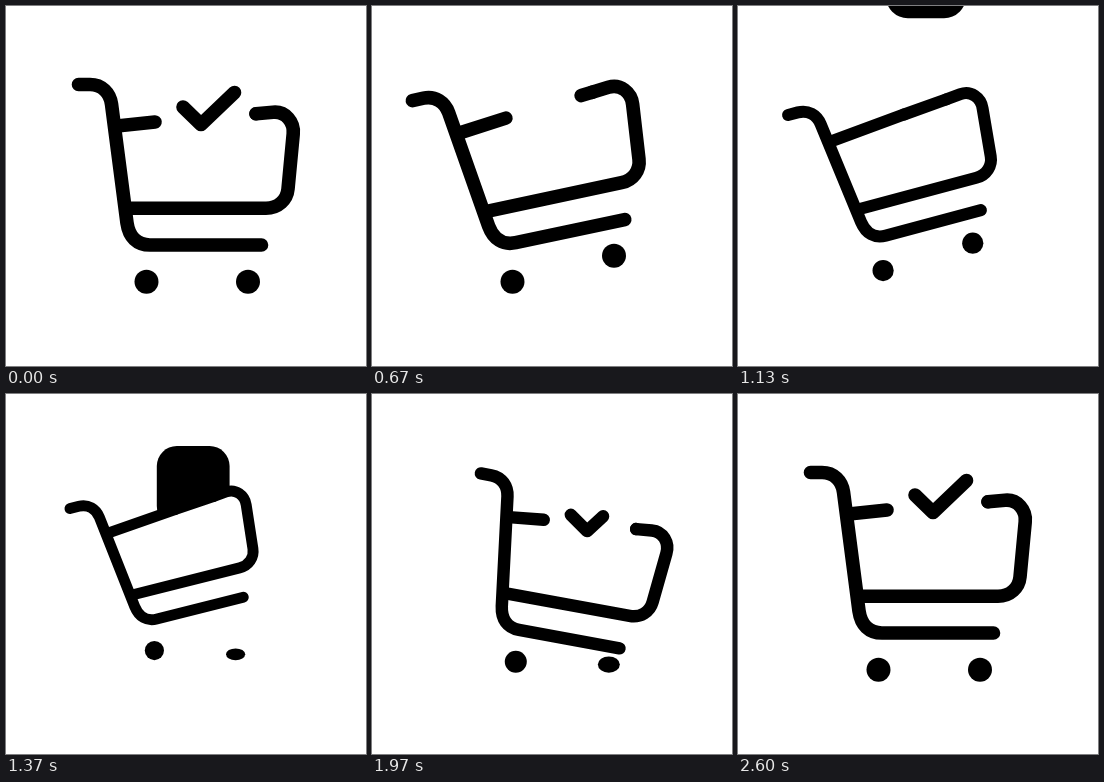
An HTML page for the animation above (2.63 s loop, 360x360 px).

```html
<!DOCTYPE html>
<html lang="en">
<head>
<meta charset="utf-8">
<title>Cart</title>
<style>
  html, body { margin: 0; width: 100%; height: 100%; overflow: hidden; background: #fff; }
  svg { display: block; width: 100%; height: 100%; }
  .line { fill: none; stroke: #000; stroke-width: 13.6; stroke-linecap: round; stroke-linejoin: round; }
</style>
</head>
<body>
<svg viewBox="0 0 360 360">
  <defs>
    <clipPath id="above"><path id="rim" d="M-400 168 L700 64.5 V-500 H-400Z"/></clipPath>
  </defs>
  <g id="all">
    <g clip-path="url(#above)"><rect id="box" x="143.500" width="91" height="100" rx="25"/></g>
    <g id="cart" class="line">
      <path d="M72.500 78.500H84C96 78.500 104 87 105.500 98L121 217C123 231 131 239 144 239H255.500"/>
      <path d="M120 202.300H260C272 202.300 281 194 282 183L287.200 128C288.500 116 279.500 105 267 106.200L250 107.800"/>
      <path id="leftBar"/>
      <path id="rightBar"/>
      <path id="check" d="M177 101L195 118.500L228.500 86.500" pathLength="1"/>
    </g>
    <circle cx="140.500" cy="275.700" r="12"/>
    <ellipse id="wheel" cx="242" rx="12"/>
  </g>
</svg>
<script>
const LOOP = 2630;
const PIVOT = '133 239.5';
const $ = id => document.getElementById(id);
const set = (id, attrs) => {
  for (const k in attrs) $(id).setAttribute(k, attrs[k]);
};
const clamp = p => Math.max(0, Math.min(1, p));
const span = (t, a, b) => clamp((t - a) / (b - a));
const ease = (t, a, b) => {
  const p = span(t, a, b);
  return p < 0.5 ? 4 * p ** 3 : 1 - 4 * (1 - p) ** 3;
};

function draw(t) {
  const tilt = -15 * ease(t, 364, 850) + 25.6 * ease(t, 1280, 1731) - 10.6 * ease(t, 1922, 2202);
  const scale = 1 - 0.2 * ease(t, 960, 1283) + 0.1 * ease(t, 1370, 1734) + 0.1 * ease(t, 1897, 2110);
  const turn = `rotate(${tilt} ${PIVOT})`;
  set('all', { transform: `translate(180 180) scale(${scale}) translate(-180 -180)` });
  set('cart', { transform: turn });
  set('rim', { transform: turn });

  // The two halves of the rim meet in the middle
  const shut = ease(t, 560, 850) - ease(t, 1640, 1900);
  const reach = 50.5 * shut;
  set('leftBar', { d: `M111 120L${149 + reach} ${116 - reach * 0.081}` });
  set('rightBar', { d: `M250 107.800L${250 - reach} ${107.8 + reach * 0.081}` });

  const drawn = 1 - ease(t, 450, 700) + ease(t, 1850, 2062);
  set('check', {
    visibility: drawn > 0.01 ? 'visible' : 'hidden',
    'stroke-dasharray': drawn > 0.999 ? 'none' : `${drawn} 2`,
    transform: `rotate(${-30 * (1 - drawn)} 203 102.5)`
  });

  const fall = Math.max(0, t - 1130);
  set('box', {
    y: -110 + 0.00224 * fall ** 2,
    visibility: t > 1130 && t < 1580 ? 'visible' : 'hidden'
  });

  // The front wheel lifts, drops flat, and is pressed by the leaning cart
  const lift = 31 * (ease(t, 330, 850) - span(t, 1200, 1330) ** 2);
  const bump = 0.4 * Math.sin(Math.PI * span(t, 1325, 1435));
  const press = 0.11 * Math.max(0, tilt - 8);
  const ry = 12 * (1 - bump - press);
  set('wheel', { cy: 287.7 - ry - lift, ry });
}

const start = performance.now();
function tick(now) {
  draw(Math.max(0, now - start) % LOOP);
  requestAnimationFrame(tick);
}
draw(0);
requestAnimationFrame(tick);
</script>
</body>
</html>
```
